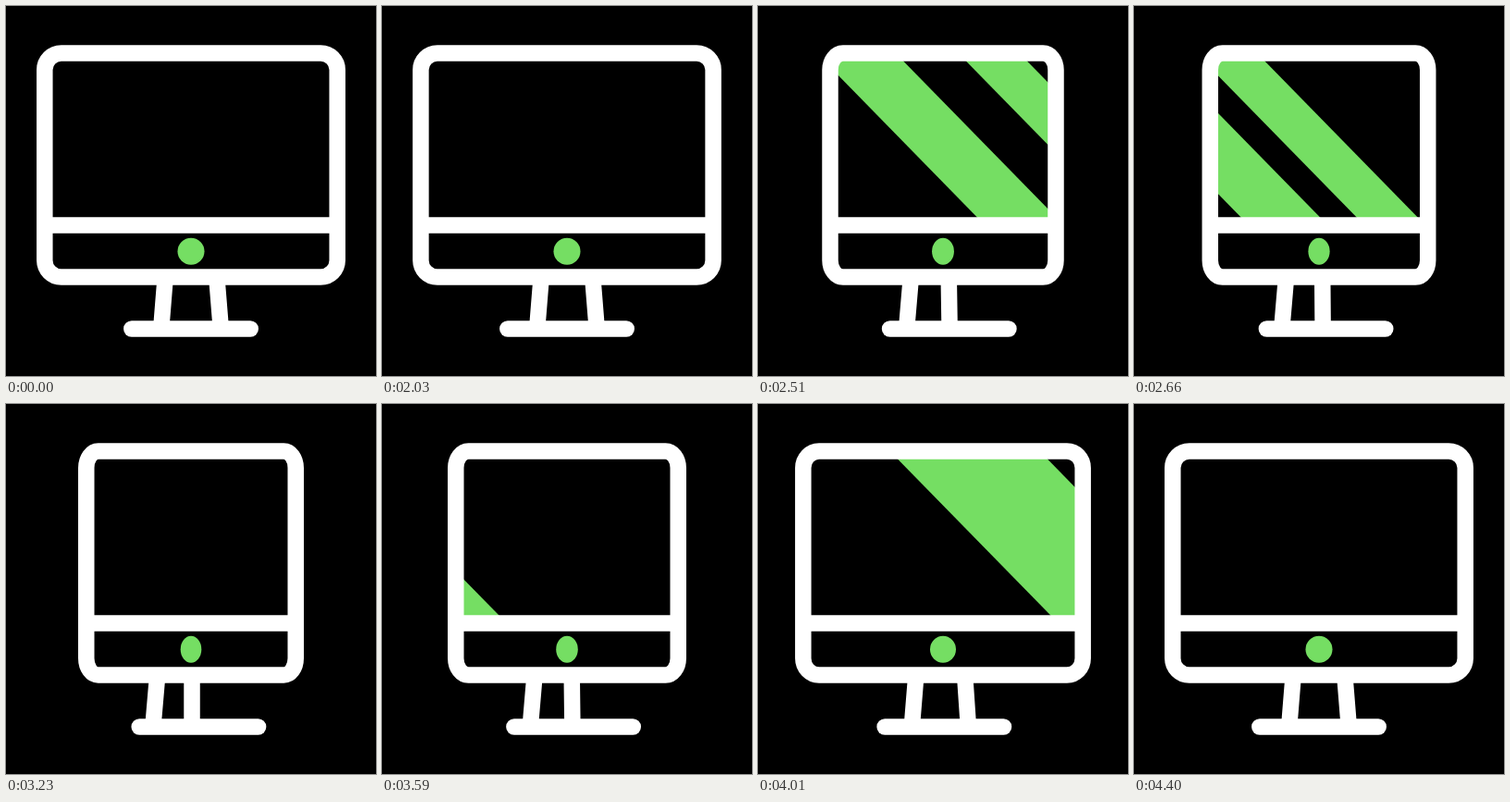
These frames come from a looping animation (400 by 400 pixels, 4430 ms). An HTML page:

```html
<!DOCTYPE html>
<html lang="en">
<head>
<meta charset="utf-8">
<title>Turning monitor</title>
<style>
  html, body { margin: 0; width: 100%; height: 100%; overflow: hidden; background: #000; }
  svg { display: block; width: 100%; height: 100%; }
</style>
</head>
<body>
<svg viewBox="0 0 400 400">
  <defs>
    <clipPath id="screen"><rect id="glass" y="51" height="186"/></clipPath>
  </defs>
  <g clip-path="url(#screen)" fill="#75de63">
    <path id="wide"/>
    <path id="narrow"/>
    <path id="sheen"/>
  </g>
  <ellipse id="dot" cx="200" cy="265.3" ry="14.5" fill="#75de63"/>
  <g fill="none" stroke="#fff" stroke-width="17.5">
    <rect id="frame" y="51" height="242" ry="18"/>
    <path id="divider"/>
    <path id="legs"/>
    <path id="base" stroke-linecap="round"/>
  </g>
</svg>
<script>
const LOOP = 4430, START = 2000, STEP = 30, HALF = 1200, SWEEP = 1040;
const el = id => document.getElementById(id);
const set = (id, attrs) => {
  for (const name in attrs) el(id).setAttribute(name, attrs[name]);
};
const mix = (a, b, u) => a + (b - a) * u;
const clamp = u => Math.min(1, Math.max(0, u));
const smooth = u => { u = clamp(u); return u * u * (3 - 2 * u); };

// Cubic easing with handles (x1, 0) and (x2, 1)
function ease(x1, x2, u) {
  u = clamp(u);
  let lo = 0, hi = 1;
  for (let i = 0; i < 24; i++) {
    const s = (lo + hi) / 2, r = 1 - s;
    if (3 * s * r * r * x1 + 3 * s * s * r * x2 + s * s * s < u) lo = s;
    else hi = s;
  }
  return smooth(lo);
}

// Slanted band whose middle crosses y = 144 at x
function band(id, x, width) {
  const w = width / 2, top = x - 92, bottom = x + 92;
  set(id, { d: `M${top - w} 50H${top + w}L${bottom + w} 238H${bottom - w}Z` });
}

function draw(time) {
  const ms = Math.max(0, Math.floor((time % LOOP - START) / STEP) * STEP);
  const turn = ms < HALF
    ? ease(0.33, 0, ms / HALF)
    : 1 - ease(0.6, 0.4, (ms - HALF) / HALF);

  const half = mix(158.2, 113.2, turn);
  const left = 200 - half, width = 2 * half;
  set("frame", { x: left, width, rx: 18 * half / 158.2 });
  set("glass", { x: left, width });
  set("divider", { d: `M${left} 237H${200 + half}` });
  set("dot", { rx: mix(14.5, 11.3, turn) });

  const legs = [[172.2, 163.7, 167.7, 158.9], [227.8, 201, 232.3, 201]];
  set("legs", {
    d: legs.map(([a, b, c, d]) =>
      `M${mix(a, b, turn)} 293L${mix(c, d, turn)} 349`).join("")
  });
  set("base", { d: `M${135.8 + 8.4 * turn} 349h128.4` });

  // Two bands cross leftwards, one broad band returns
  band("wide", mix(475.5, -98, smooth(ms / SWEEP)), 85.5);
  band("narrow", mix(652, -150, smooth(ms / HALF)), 66);
  band("sheen", mix(-116, 514, smooth((ms - 2 * HALF + SWEEP) / SWEEP)), 162);
}

function tick(now) {
  draw(now);
  requestAnimationFrame(tick);
}
draw(0);
requestAnimationFrame(tick);
</script>
</body>
</html>
```
